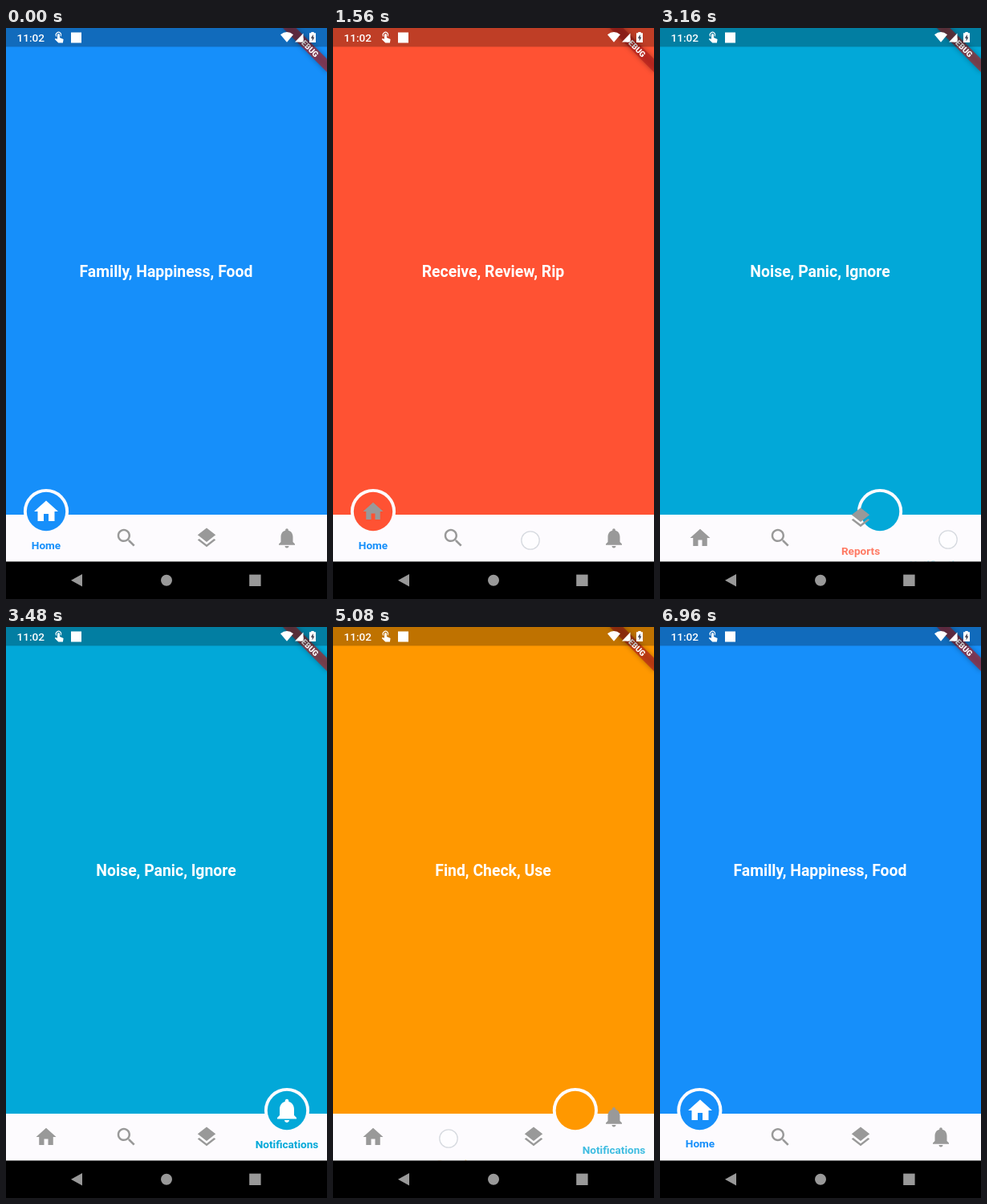
An HTML page with a canvas that plays this animation: 400x711 px, repeating every 7 s.

```html
<!DOCTYPE html>
<html lang="en">
<head>
<meta charset="utf-8">
<title>Bottom navigation</title>
<style>
  html, body { margin: 0; width: 100%; height: 100%; overflow: hidden; background: #000; }
  canvas { display: block; width: 400px; height: 711px; }
</style>
</head>
<body>
<canvas></canvas>
<script>
const LOOP = 7000, STEP = 40, DURATION = 300, DELAY = 25, TOUCH_LEAD = 160, TOUCH_LENGTH = 280;
const GREY = '#999', WHITE = '#fff';

const tabs = [
  { label: 'Home', title: 'Familly, Happiness, Food', color: '#168ffa',
    icon: 'M10 20v-6h4v6h5v-8h3L12 3 2 12h3v8z' },
  { label: 'Search', title: 'Find, Check, Use', color: '#ff9800',
    icon: 'M15.5 14h-.79l-.28-.27C15.41 12.59 16 11.11 16 9.5 16 5.91 13.09 3 9.5 3S3 5.91 3 9.5 5.91 16 9.5 16c1.61 0 3.09-.59 4.23-1.57l.27.28v.79l5 4.99L20.49 19l-4.99-5zm-6 0C7.01 14 5 11.99 5 9.5S7.01 5 9.5 5 14 7.01 14 9.5 11.99 14 9.5 14z' },
  { label: 'Reports', title: 'Receive, Review, Rip', color: '#ff5233',
    icon: 'M11.99 18.54l-7.37-5.73L3 14.07l9 7 9-7-1.63-1.27-7.38 5.74zM12 16l7.36-5.73L21 9l-9-7-9 7 1.63 1.27L12 16z' },
  { label: 'Notifications', title: 'Noise, Panic, Ignore', color: '#02a8d8',
    icon: 'M12 22c1.1 0 2-.9 2-2h-4c0 1.1.89 2 2 2zm6-6v-5c0-3.07-1.64-5.64-4.5-6.32V4c0-.83-.67-1.5-1.5-1.5s-1.5.67-1.5 1.5v.68C7.63 5.36 6 7.92 6 11v5l-2 2v1h16v-1l-2-2z' },
];
tabs.forEach((tab, i) => { tab.x = 50 + 100 * i; tab.shape = new Path2D(tab.icon); });

const taps = [
  { at: 1560, from: 0, to: 2, x: 246, y: 638 },
  { at: 3120, from: 2, to: 3, x: 359, y: 637 },
  { at: 5040, from: 3, to: 1, x: 144, y: 637 },
  { at: 6640, from: 1, to: 0, x: 44, y: 640 },
];

const canvas = document.querySelector('canvas');
const ratio = window.devicePixelRatio || 1;
canvas.width = 400 * ratio;
canvas.height = 711 * ratio;
const ctx = canvas.getContext('2d');
ctx.scale(ratio, ratio);

const clamp = v => Math.max(0, Math.min(1, v));
const mix = (a, b, p) => a + (b - a) * p;
const bezier = (a, b, s) => 3 * a * s * (1 - s) ** 2 + 3 * b * s * s * (1 - s) + s ** 3;

// Ease-out with a slight overshoot: cubic-bezier(.175, .885, .32, 1.275)
function easeOutBack(x) {
  if (x <= 0 || x >= 1) return clamp(x);
  let low = 0, high = 1;
  for (let i = 0; i < 24; i++) {
    const mid = (low + high) / 2;
    if (bezier(.175, .32, mid) < x) low = mid; else high = mid;
  }
  return bezier(.885, 1.275, low);
}

function rect(x, y, w, h, color) {
  ctx.fillStyle = color;
  ctx.fillRect(x, y, w, h);
}

function disc(x, y, r, color) {
  ctx.fillStyle = color;
  ctx.beginPath();
  ctx.arc(x, y, r, 0, 2 * Math.PI);
  ctx.fill();
}

function text(string, x, y, font, color, align = 'center') {
  ctx.font = font + ' Roboto, sans-serif';
  ctx.textAlign = align;
  ctx.fillStyle = color;
  ctx.fillText(string, x, y);
}

function icon(shape, x, y, scale, color) {
  ctx.save();
  ctx.translate(x, y);
  ctx.scale(scale, scale);
  ctx.translate(-12, -12);
  ctx.fillStyle = color;
  ctx.fill(shape);
  ctx.restore();
}

function fillPath(d, color) {
  ctx.fillStyle = color;
  ctx.fill(new Path2D(d));
}

function withAlpha(alpha, draw) {
  ctx.globalAlpha = clamp(alpha);
  draw();
  ctx.globalAlpha = 1;
}

function drawLabel(tab, shown) {
  withAlpha(shown, () =>
    text(tab.label, tab.x, mix(680.5, 648.5, shown), 'bold 13.6px', tab.color));
}

function drawBanner() {
  ctx.save();
  ctx.translate(400, 0);
  ctx.rotate(Math.PI / 4);
  ctx.shadowColor = 'rgba(0,0,0,.5)';
  ctx.shadowBlur = 6 * ratio;
  rect(-39, 27.2, 78, 11.7, 'rgba(183,28,28,.63)');
  ctx.shadowColor = 'transparent';
  text('DEBUG', 0, 36.6, '900 9.9px', WHITE);
  ctx.restore();
}

function drawStatusBar() {
  rect(0, 0, 400, 23.4, 'rgba(0,0,0,.25)');
  text('11:02', 13.5, 17, '500 13.6px', WHITE, 'left');
  // Pointing hand
  fillPath('M64 8.6a1.5 1.5 0 0 1 3 0V12l4.6 2.1-.7 4.4h-5.6l-4.5-4.6.8-.8 2.4.6z', WHITE);
  ctx.strokeStyle = WHITE;
  ctx.lineWidth = 1.2;
  ctx.beginPath();
  ctx.arc(65.5, 8.6, 3.2, 2.5, 6.9);
  ctx.stroke();
  rect(81, 5.5, 13, 13, WHITE);
  fillPath('M342 8.2Q350 2 358 8.2L350 17.8z', WHITE);
  fillPath('M360 17.5L370.5 6.5V17.5z', WHITE);
  fillPath('M380.3 5h3.4v1.3h2.3v11.7h-8V6.3h2.3z', WHITE);
  fillPath('M382.8 8l-3 4.8h1.8v3.6l2.8-5h-1.6z', '#445');
}

function drawSystemBar() {
  rect(0, 664.4, 400, 47, '#000');
  fillPath('M81 687.8L95 680V695.6z', GREY);
  disc(200, 687.7, 7, GREY);
  rect(303.2, 680.6, 14.4, 14.4, GREY);
}

function drawTouch(t) {
  const touch = taps.find(({ at }) => t >= at - TOUCH_LEAD && t < at - TOUCH_LEAD + TOUCH_LENGTH);
  if (!touch) return;
  disc(touch.x, touch.y, 11.2, 'rgba(255,255,255,.55)');
  ctx.strokeStyle = 'rgba(200,206,212,.75)';
  ctx.lineWidth = 1.3;
  ctx.stroke();
}

function render(t) {
  const tap = taps.findLast(({ at }) => t >= at);
  const current = tabs[tap ? tap.to : 0];
  const previous = tap && tabs[tap.from];
  const elapsed = tap ? t - tap.at - DELAY : DURATION;
  const p = easeOutBack(elapsed / DURATION);
  const circleX = previous ? mix(previous.x, current.x, p) : current.x;

  rect(0, 0, 400, 711, current.color);
  text(current.title, 199.5, 310.3, 'bold 19.4px', WHITE);

  rect(0, 606, 400, 59, '#fdfbfe');
  disc(circleX, 602, 28.1, '#fdfbfe');
  disc(circleX, 602, 24.2, current.color);
  withAlpha((elapsed - 215) / 60, () => icon(current.shape, current.x, 602, 1.5, WHITE));

  for (const tab of tabs) {
    if (tab === current) continue;
    icon(tab.shape, tab.x, tab === previous ? mix(602, 635, p) : 635, 1.25, GREY);
  }
  if (previous) drawLabel(previous, 1 - p);
  drawLabel(current, p);

  drawSystemBar();
  drawBanner();
  drawStatusBar();
  drawTouch(t);
}

const start = performance.now();
function tick() {
  const t = (performance.now() - start) % LOOP;
  render(Math.floor(t / STEP) * STEP);
  requestAnimationFrame(tick);
}
tick();
</script>
</body>
</html>
```
